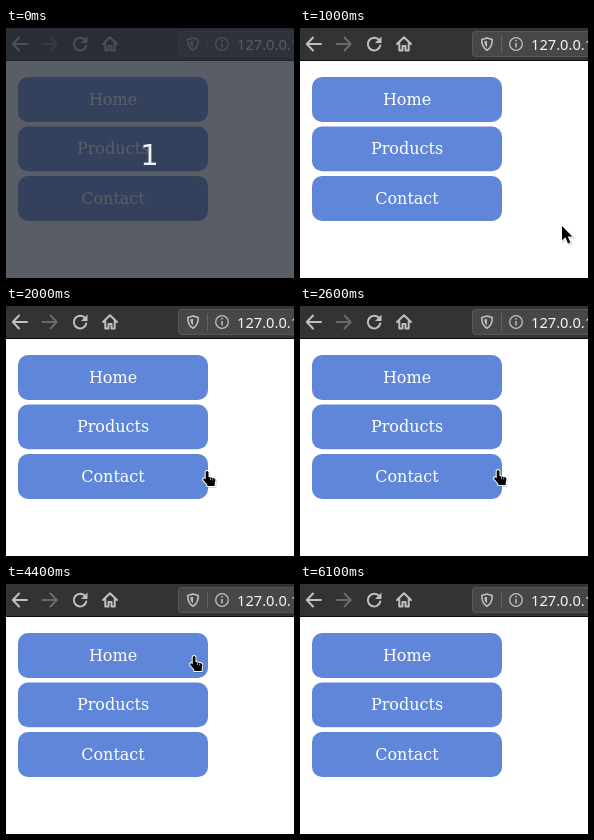
An HTML page that plays this animation: 288x250 px, repeating every 7000 ms.

```html
<!DOCTYPE html>
<html lang="en">
<head>
<meta charset="utf-8">
<title>Menu hover</title>
<style>
  html, body { margin: 0; width: 100%; height: 100%; overflow: hidden; background: #fff; }
  svg { display: block; width: 288px; height: 250px; }
  .menu rect { fill: #5f86d9; }
  .menu text { font: 16px "DejaVu Serif", serif; fill: #fff; text-anchor: middle; }
  .icon { fill: none; stroke: #bfc0c1; stroke-width: 2; stroke-linecap: round; stroke-linejoin: round; }
  .url { font: 14.67px "Noto Sans", "Open Sans", sans-serif; fill: #f4f4f5; }
  .count { font: 29px "DejaVu Sans", sans-serif; fill: #eceff4; text-anchor: middle; }
  .pointer { fill: #000; stroke: #fff; stroke-width: 2; stroke-linejoin: round; paint-order: stroke; }
  .shade { fill: #000; stroke: #000; stroke-width: 2; opacity: .16; }
</style>
</head>
<body>
<svg viewBox="0 0 288 250">
  <defs>
    <path id="arrow-shape" d="M0 0V14.3L3.4 11.3L6 17.4L8.4 16.4L5.8 10.4H10.3Z"/>
    <path id="hand-shape" d="M-1.3 1Q0 -.8 1.5 1V6L7 7.2Q8.6 7.8 8.4 9.4L7.7 12.4V15H.3V13.4L-3.8 9Q-4.3 7.2 -2.6 7.2L-1.3 8.4Z"/>
  </defs>
  <rect width="288" height="250" fill="#fff"/>

  <g id="toolbar">
    <rect width="288" height="32" fill="#313335"/>
    <rect y="32" width="288" height="1" fill="#0d0d0e"/>
    <path class="icon" d="M21 16H7M13 9.5L6.8 16L13 22.5"/>
    <path class="icon" d="M36.500 16H50.500M44.500 9.500L50.700 16L44.500 22.500" style="stroke:#696a6c"/>
    <path class="icon" d="M79.300 12.500A6.300 6.300 0 1 0 80.300 17.500"/>
    <path d="M81.500 8.500V15H75Z" fill="#bfc0c1"/>
    <path class="icon" d="M97 16L104 9.200L111 16M99.300 15V22.500H102.500V18H105.500V22.500H108.700V15"/>
    <rect x="172.500" y="3.500" width="140" height="25" rx="3" fill="#474749" stroke="#58585a"/>
    <path class="icon" d="M187 10L192.200 11.500Q192.500 19 187 22.300Q181.500 19 181.800 11.500Z" style="stroke-width:1.6"/>
    <path d="M187 12.800V19.500Q184.300 17.500 184.300 13.500Z" fill="#bfc0c1"/>
    <path d="M201.500 7.500V24.500" stroke="#646467"/>
    <circle class="icon" cx="216" cy="16" r="6.300" style="stroke-width:1.300"/>
    <path d="M216 15V19.500M216 12V13.500" stroke="#bfc0c1" stroke-width="1.500"/>
    <text class="url" x="231" y="22">127.0.0.1</text>
  </g>

  <g class="menu">
    <rect x="12" y="49" width="190" height="45" rx="10"/>
    <rect x="12" y="98.600" width="190" height="44.700" rx="10"/>
    <rect x="12" y="148" width="190" height="45" rx="10"/>
    <text x="107" y="77">Home</text>
    <text x="107" y="126">Products</text>
    <text x="107" y="176">Contact</text>
  </g>

  <g id="countdown">
    <rect width="288" height="250" fill="#282d37" opacity=".77"/>
    <text class="count" x="143.500" y="136.500">1</text>
  </g>

  <g id="cursor">
    <g id="arrow">
      <use href="#arrow-shape" class="shade" x="1" y="1"/>
      <use href="#arrow-shape" class="pointer"/>
    </g>
    <g id="hand">
      <use href="#hand-shape" class="shade" x=".7" y="1"/>
      <use href="#hand-shape" class="pointer"/>
      <path d="M3.500 7V9M5.700 7.500V9.500" stroke="#fff" stroke-width=".6"/>
    </g>
  </g>
</svg>
<script>
const LOOP = 7000, STEP = 100;
const COUNTDOWN_END = 300, CURSOR_IN = 900, CURSOR_OUT = 6100;
const LINK_EDGE = 209.6;

// Pointer moves: start time, number of steps, destination of the hotspot.
const entry = { x: 289, y: 212 };
const moves = [
  [900, 6, 209, 171],
  [1500, 2, 193, 166],
  [1700, 1, 192, 166],
  [1900, 4, 210, 164],
  [2400, 3, 198, 164],
  [3200, 1, 212, 154],
  [3500, 3, 222, 119],
  [3800, 1, 217, 93],
  [4000, 5, 188, 72],
  [5100, 2, 206, 70],
  [5500, 2, 213, 67],
  [5700, 4, 238, 78]
];

const el = id => document.getElementById(id);
const [countdown, cursor, arrow, hand] = ["countdown", "cursor", "arrow", "hand"].map(el);
const show = (node, on) => node.setAttribute("visibility", on ? "visible" : "hidden");

function hotspot(t) {
  let { x, y } = entry;
  for (const [start, steps, toX, toY] of moves) {
    if (t < start) break;
    const done = Math.min(steps, Math.floor((t - start) / STEP) + 1) / steps;
    x += (toX - x) * done;
    y += (toY - y) * done;
  }
  return { x, y };
}

function render(t) {
  show(countdown, t < COUNTDOWN_END);
  const visible = t >= CURSOR_IN && t < CURSOR_OUT;
  const { x, y } = hotspot(t);
  const overLink = x < LINK_EDGE;
  show(arrow, visible && !overLink);
  show(hand, visible && overLink);
  cursor.setAttribute("transform", `translate(${Math.round(x)} ${Math.round(y)})`);
}

const began = performance.now();
function tick() {
  render((performance.now() - began) % LOOP);
  requestAnimationFrame(tick);
}
render(0);
requestAnimationFrame(tick);
</script>
</body>
</html>
```
